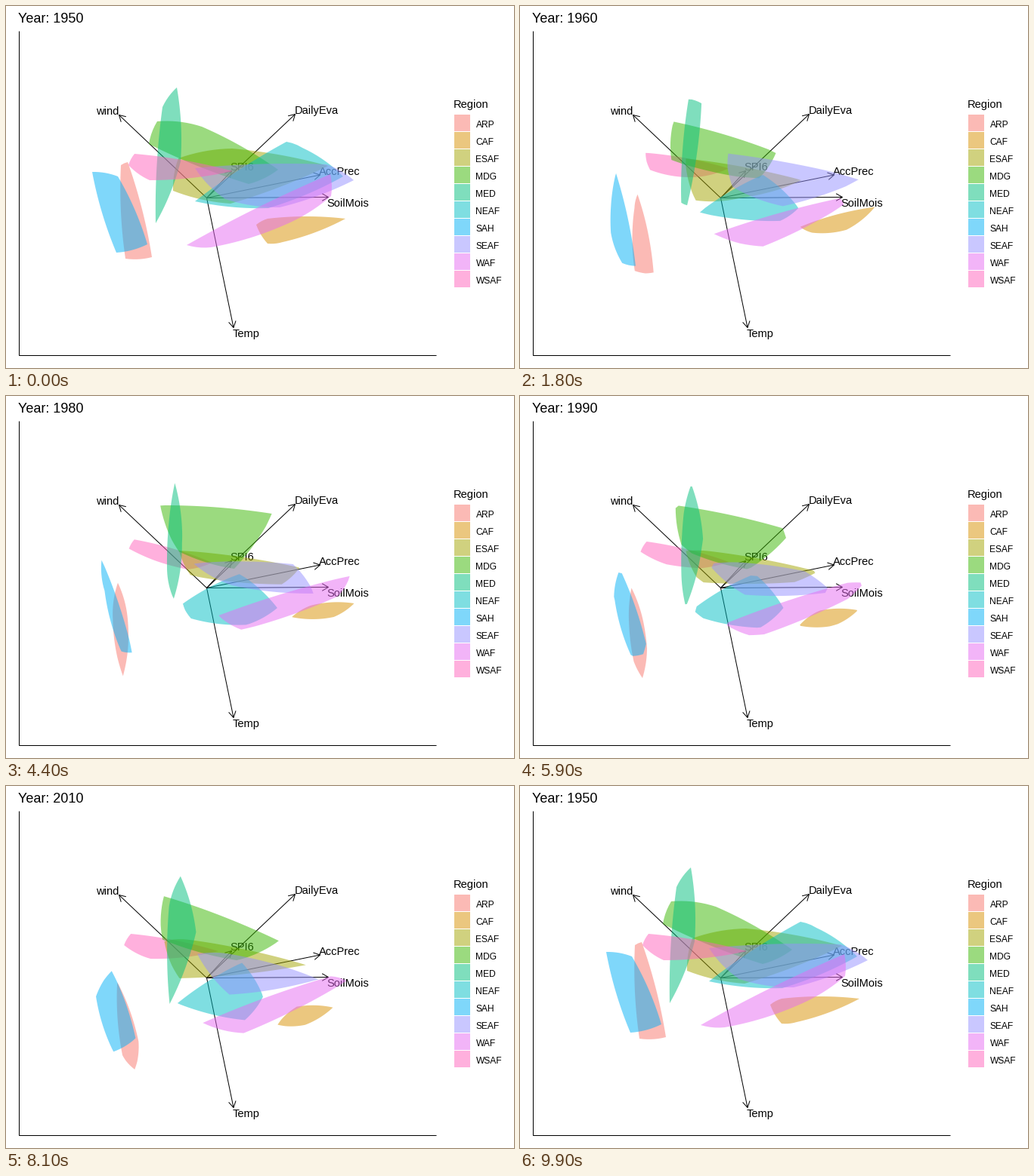
Write a matplotlib script that moves like this. It is 672 px wide and 480 px high and loops after 10000 ms.

```python
import math

import matplotlib.pyplot as plt
import numpy as np
from matplotlib.animation import FuncAnimation
from matplotlib.patches import Polygon, Rectangle

W, H, DPI = 672, 480, 96
FRAMES, STEP_MS = 100, 100
YEARS = list(range(1950, 2030, 10))
STARTS = [5, 18, 31, 44, 56, 69, 81, 93]   # frame where each morph begins
LENGTHS = [8, 8, 8, 7, 8, 7, 7, 7]
KEY_YEARS = [1950, 1960, 1980, 2010, 2060]  # the last key repeats the first
POINTS = 60

plt.rcParams["font.family"] = "Liberation Sans"
regions = []


def region(name, color, *keys):
    """Register a region by the corners of its key hulls, clockwise."""
    regions.append((name, color, keys))


region("ARP", "#F8766D",
       [(152, 211), (161, 207), (193, 333), (158, 335)],
       [(156, 250), (178, 353), (152, 351), (152, 268)],
       [(148, 247), (161, 300), (154, 371), (141, 295)],
       [(147, 262), (175, 340), (170, 377), (154, 358)])
region("CAF", "#D89000",
       [(331, 290), (346, 282), (449, 282), (366, 313), (346, 315)],
       [(370, 293), (470, 266), (432, 297), (386, 301)],
       [(379, 292), (404, 277), (462, 274), (435, 292)],
       [(360, 317), (385, 293), (432, 294), (396, 317)])
region("ESAF", "#A3A500",
       [(228, 202), (299, 189), (426, 212), (297, 262), (221, 245)],
       [(218, 202), (371, 231), (290, 255), (231, 259)],
       [(230, 205), (388, 227), (365, 250), (245, 237)],
       [(209, 206), (240, 204), (396, 238), (229, 255)])
region("MDG", "#39B600",
       [(200, 153), (259, 160), (360, 217), (321, 236), (189, 183)],
       [(203, 154), (338, 197), (316, 230), (199, 205)],
       [(204, 145), (352, 154), (302, 229), (229, 206)],
       [(209, 146), (361, 205), (305, 231), (207, 204)])
region("MED", "#00BF7D",
       [(207, 134), (226, 108), (231, 206), (198, 288)],
       [(223, 124), (241, 129), (221, 264), (213, 261)],
       [(223, 115), (232, 195), (222, 268), (213, 230)],
       [(231, 120), (252, 194), (217, 289), (216, 160)])
region("NEAF", "#00BFC4",
       [(250, 259), (371, 180), (392, 188), (446, 226), (347, 268)],
       [(238, 273), (322, 223), (369, 267), (345, 284)],
       [(234, 275), (309, 236), (360, 281), (318, 303), (245, 295)],
       [(226, 289), (310, 236), (337, 281), (314, 312)])
region("SAH", "#00B0F6",
       [(114, 220), (148, 226), (187, 316), (146, 327)],
       [(127, 222), (152, 345), (134, 341), (119, 301)],
       [(126, 216), (167, 340), (153, 338), (131, 257)],
       [(119, 280), (140, 246), (171, 335), (142, 353)])
region("SEAF", "#9590FF",
       [(250, 215), (424, 210), (460, 231), (362, 267), (290, 256)],
       [(276, 194), (451, 229), (349, 266), (282, 240)],
       [(248, 222), (380, 222), (407, 262), (300, 250)],
       [(253, 223), (300, 224), (412, 257), (295, 277)])
region("WAF", "#E76BF3",
       [(239, 317), (429, 223), (430, 252), (367, 291), (271, 320)],
       [(255, 303), (421, 256), (427, 264), (320, 320)],
       [(282, 290), (455, 238), (440, 265), (312, 309)],
       [(261, 314), (430, 253), (451, 259), (315, 328)])
region("WSAF", "#FF62BC",
       [(170, 196), (300, 219), (190, 231), (162, 211)],
       [(166, 195), (276, 215), (228, 227), (172, 218)],
       [(163, 202), (170, 190), (272, 221), (240, 230)],
       [(156, 211), (165, 196), (280, 219), (191, 229)])


def outline(corners):
    """Spread POINTS vertices over slightly outward-bowed edges."""
    p = np.array(corners, float)
    edges = np.roll(p, -1, axis=0) - p
    lengths = np.hypot(*edges.T)
    parts = np.ones(len(p), int)
    while parts.sum() < POINTS:
        parts[np.argmax(lengths / parts)] += 1
    pts = []
    for a, e, size, n in zip(p, edges, lengths, parts):
        normal = np.array([e[1], -e[0]]) / size
        bow = min(0.05 * size, 3)
        pts += [a + e * t + normal * bow * 4 * t * (1 - t)
                for t in np.arange(n) / n]
    return np.array(pts)


def align(a, b):
    """Rotate the vertex order of b so that it lies closest to a."""
    rolls = (np.roll(b, k, axis=0) for k in range(POINTS))
    return min(rolls, key=lambda r: ((r - a) ** 2).sum())


def blend(a, b, t):
    return a + (align(a, b) - a) * t


def decades(keys):
    """Hull of every decade, drifting evenly between the key years."""
    hulls = [outline(k) for k in keys + keys[:1]]
    result = []
    for year in YEARS:
        i = max(j for j, key in enumerate(KEY_YEARS) if key <= year)
        t = (year - KEY_YEARS[i]) / (KEY_YEARS[i + 1] - KEY_YEARS[i])
        result.append(blend(hulls[i], hulls[i + 1], t))
    return result


def morphs(hulls):
    return [(a, align(a, b)) for a, b in zip(hulls, hulls[1:] + hulls[:1])]


def px(size):
    return size * 72 / DPI


fig = plt.figure(figsize=(W / DPI, H / DPI), dpi=DPI, facecolor="white")
ax = fig.add_axes([0, 0, 1, 1])
ax.set_xlim(0, W)
ax.set_ylim(H, 0)
ax.axis("off")


def line(xs, ys):
    ax.plot(xs, ys, color="black", lw=px(1), zorder=1,
            solid_capstyle="butt", solid_joinstyle="miter")


def label(x, y, s, size, ha="left"):
    return ax.text(x, y, s, fontsize=px(size), ha=ha, va="baseline",
                   color="black", zorder=2)


def arrow(x, y, x0=265.5, y0=254.5, head=9.6):
    line([x0, x], [y0, y])
    back = math.atan2(y0 - y, x0 - x)
    wings = [(x + head * math.cos(back + s), y + head * math.sin(back + s))
             for s in (-math.pi / 6, math.pi / 6)]
    line(*zip(wings[0], (x, y), wings[1]))


line([17.2, 17.2, 569], [33, 462.7, 462.7])
title = label(16.5, 22, "", 18)

for name, tip, base, ha in [("wind", (149.5, 144.5), (149, 144.5), "right"),
                            ("DailyEva", (382.5, 143.5), (381.5, 143.5), "left"),
                            ("SPI6", (298.5, 218.5), (296.5, 218.5), "left"),
                            ("AccPrec", (415.5, 224), (413.5, 224.5), "left"),
                            ("SoilMois", (426.5, 253.5), (424.5, 265.5), "left"),
                            ("Temp", (301, 426.5), (299.5, 438.5), "left")]:
    arrow(*tip)
    label(*base, name, 14.67, ha)

label(591.5, 135, "Region", 14.67)
shapes = []
for i, (name, color, keys) in enumerate(regions):
    top = round(144 + 23.04 * i)
    ax.add_patch(Rectangle((593, top), 21, 22, fc=color, alpha=0.5, lw=0))
    label(621.5, top + 17, name, 12)
    hulls = decades(keys)
    patch = Polygon(hulls[0], closed=True, fc=color, ec="none", lw=0, alpha=0.5)
    ax.add_patch(patch)
    shapes.append((patch, morphs(hulls)))

# Moving hulls are stacked by group number sorted as text: 1, 10, 2, 3, ...
resting = list(range(len(shapes)))
moving = sorted(resting, key=lambda i: str(i + 1))


def phase(frame):
    """Index of the current morph and its progress from 0 to 1."""
    state, t = 0, 0.0
    for i, (start, n) in enumerate(zip(STARTS, LENGTHS)):
        if frame >= start:
            state, t = i, min((frame - start + 1) / n, 1.0)
    return state, t


def update(frame):
    state, t = phase(frame)
    order = moving if 0 < t < 1 else resting
    for i, (patch, pairs) in enumerate(shapes):
        a, b = pairs[state]
        patch.set_xy(a + (b - a) * t)
        patch.set_zorder(3 + order.index(i))
    nearest = (state + (t > 0.5)) % len(YEARS)
    title.set_text(f"Year: {YEARS[nearest]}")
    return [title] + [patch for patch, _ in shapes]


anim = FuncAnimation(fig, update, frames=FRAMES, interval=STEP_MS,
                     repeat=True, repeat_delay=0, blit=False)
plt.show()
```
